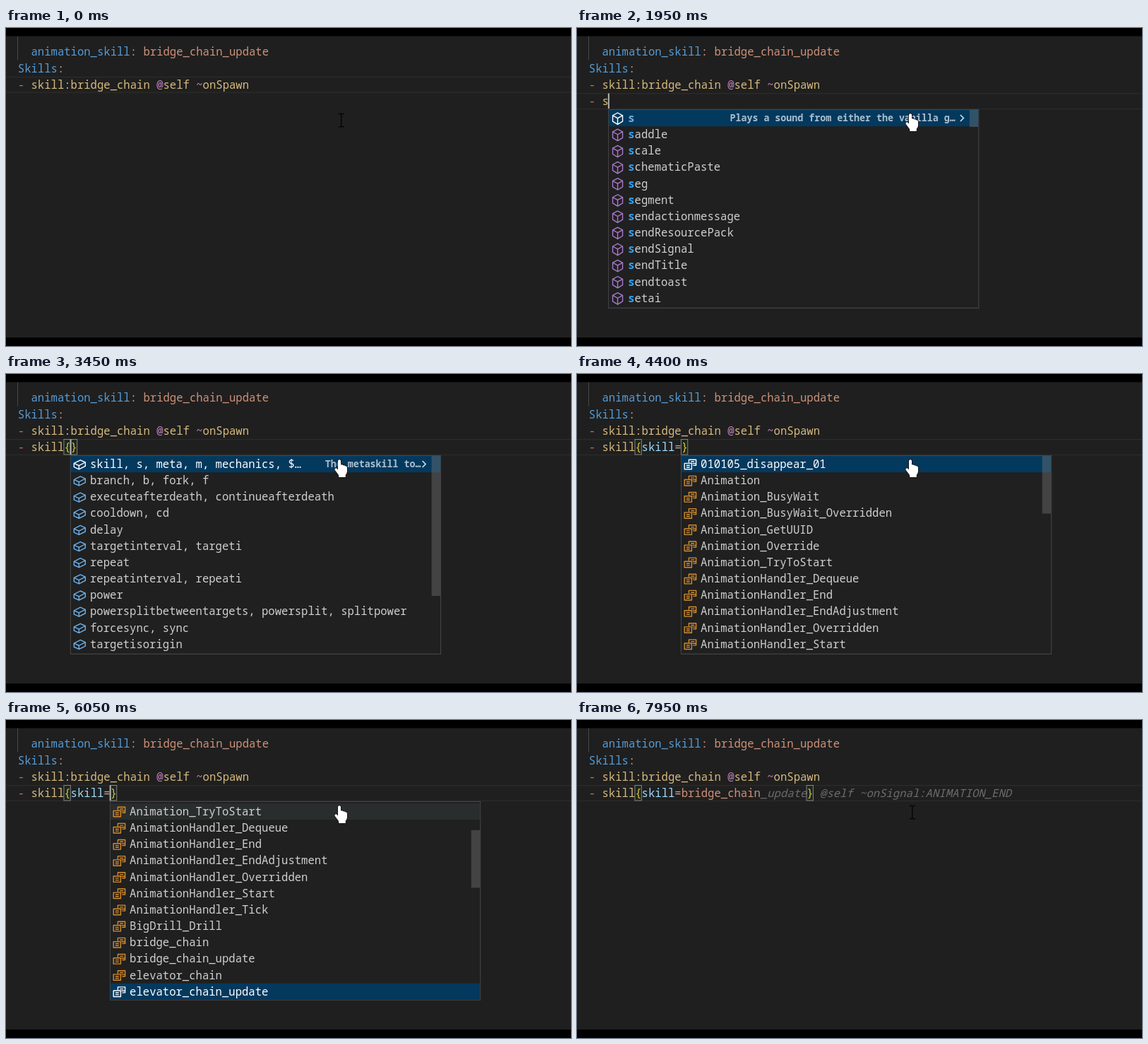
Write an HTML page with a canvas that moves like this. It is 800 px wide and 450 px high and loops after 8000 ms.

```html
<!DOCTYPE html>
<html lang="en">
<head>
<meta charset="utf-8">
<title>Editor completion</title>
<style>
html, body { margin: 0; width: 100%; height: 100%; overflow: hidden; background: #000; }
canvas { display: block; width: 800px; height: 450px; }
</style>
</head>
<body>
<canvas id="stage" width="800" height="450"></canvas>
<script>
const g = document.getElementById('stage').getContext('2d');
const LOOP = 8000, CW = 9.35, LH = 23.15, LEFT = 16.8, TOP = 116;
const FAMILY = '"Noto Sans Mono", "DejaVu Sans Mono", monospace';
const font = (style, size = 15.58) => `${style} ${size}px ${FAMILY}`;
const C = {
  bg: '#1f1f1f', key: '#569cd6', str: '#ce9178', dash: '#c9686c', fn: '#d7ba7d',
  op: '#c586c0', param: '#9cdcfe', eq: '#c9a39b', brace: '#e2c044', ghost: '#6c6c6c',
  text: '#cfcfcf', match: '#2f9ff0', matchSel: '#76a9d6', selected: '#04395e', hover: '#2a2d2e'
};

// Brackets mark the letters that match what has been typed.
const sounds = {
  icon: 'cube', thumb: 24, detail: 'Plays a sound from either the vanilla g…', detailX: 172,
  rows: ['[s]', '[s]addle', '[s]cale', '[s]chematicPaste', '[s]eg', '[s]egment', '[s]endactionmessage',
    '[s]endResourcePack', '[s]endSignal', '[s]endTitle', '[s]endtoast', '[s]etai']
};
const skills = {
  icon: 'cube', detail: 'Executes a metaskill', detailX: 331,
  rows: ['[skill]', 'sudo[skill]', 'variable[skill]']
};
const params = {
  icon: 'brick', thumb: 198, detail: 'The metaskill to…', detailX: 360.5,
  rows: ['skill, s, meta, m, mechanics, $…', 'branch, b, fork, f', 'executeafterdeath, continueafterdeath',
    'cooldown, cd', 'delay', 'targetinterval, targeti', 'repeat', 'repeatinterval, repeati', 'power',
    'powersplitbetweentargets, powersplit, splitpower', 'forcesync, sync', 'targetisorigin']
};
const handler = ['Dequeue', 'End', 'EndAdjustment', 'Overridden', 'Start', 'Tick'];
const metaskills = {
  icon: 'cards', thumb: 81.5,
  rows: ['010105_disappear_01', 'Animation',
    ...['BusyWait', 'BusyWait_Overridden', 'GetUUID', 'Override', 'TryToStart'].map(s => 'Animation_' + s),
    ...handler.map(s => 'AnimationHandler_' + s),
    'BigDrill_Drill', 'bridge_chain', 'bridge_chain_update', 'elevator_chain', 'elevator_chain_update']
};
const filtered = {
  icon: 'cards',
  rows: ['[brid]ge_chain', '[brid]ge_chain_update', '[B]igD[r]ill_Dr[i]ll'.replace('[r]ill_Dr[i]ll', '[ri]ll_[D]rill'),
    ...['Add[B]ar[ri]ers', 'Add[B]ar[ri]ers_Exec', 'Init-[b]ar[ri]ers', 'Join-[b]ar[ri]ers',
      'Remove[B]ar[ri]ers', 'Remove[B]ar[ri]ers_Exec', 'Detach-[b]ar[ri]ers'].map(s => 'Structure' + s),
    'Animation_[B]usyWait_Over[rid]den']
};
filtered.rows[2] = '[B]igD[ri]ll_[D]rill';

// at: time of the edit, name: mechanic, value: argument (null without braces), list + typed: popup
const steps = [
  { at: 100, name: '' },
  { at: 1500, name: 's', list: sounds, typed: 1, delay: 80 },
  { at: 2040, name: 'sk', list: skills, typed: 2 },
  { at: 2200, name: 'ski', list: skills, typed: 3 },
  { at: 2320, name: 'skil', list: skills, typed: 4 },
  { at: 2440, name: 'skill', list: skills, typed: 5 },
  { at: 2960, name: 'skill', body: '', list: params, delay: 80 },
  { at: 3580, name: 'skill', body: 'skill=', list: metaskills, delay: 90 },
  { at: 6360, name: 'skill', body: 'skill=', value: 'b', list: filtered, typed: 1 },
  { at: 6480, name: 'skill', body: 'skill=', value: 'br', list: filtered, typed: 2 },
  { at: 6600, name: 'skill', body: 'skill=', value: 'bri', list: filtered, typed: 3 },
  { at: 6750, name: 'skill', body: 'skill=', value: 'brid', list: filtered, typed: 4 },
  { at: 7360, name: 'skill', body: 'skill=', value: 'bridge_chain', ghostDelay: 250 }
];

const colX = col => LEFT + col * CW;

function rect(x, y, w, h, color) {
  g.fillStyle = color;
  g.fillRect(x, y, w, h);
}

function text(s, x, y, color, style = '500', size) {
  g.font = font(style, size);
  g.fillStyle = color;
  g.fillText(s, x, y);
}

// Writes coloured pieces on an editor line and returns the next column.
function write(line, col, ...parts) {
  for (const [s, color, style] of parts) {
    text(s, colX(col), 39.4 + line * LH, color, style);
    col += s.length;
  }
  return col;
}

function poly(points, close) {
  g.beginPath();
  points.forEach(([x, y]) => g.lineTo(x, y));
  if (close) g.closePath();
  g.stroke();
}

const icons = {
  cube() {
    g.strokeStyle ||= '#b180d7';
    poly([[0, -8], [7, -4.2], [7, 4.2], [0, 8.4], [-7, 4.2], [-7, -4.2]], true);
    poly([[-7, -4.2], [0, -0.4], [7, -4.2]]);
    poly([[0, -0.4], [0, 8.4]]);
  },
  brick() {
    poly([[-8, -1.6], [1, -6.2], [8, -3], [8, 2.4], [-1, 6.8], [-8, 3.6]], true);
    poly([[-8, -1.6], [-1, 1.6], [8, -3]]);
    poly([[-1, 1.6], [-1, 6.8]]);
  },
  cards() {
    poly([[-2, -2.5], [-2, -6.8], [8.2, -6.8], [8.2, 1.2], [4, 1.2]]);
    poly([[-8.2, -1.6], [2, -1.6], [2, 6.8], [-8.2, 6.8]], true);
    for (const [x, y] of [[0.8, -4], [3, -1.4], [-5.6, 1.3], [-5.6, 4]]) poly([[x, y], [x + 5, y]]);
  }
};
const iconColor = { cube: '#a878cc', brick: '#6bb0ea', cards: '#d58c2c' };

function drawIcon(kind, x, y, selected) {
  g.save();
  g.translate(x, y);
  g.strokeStyle = selected ? '#fff' : iconColor[kind];
  g.lineWidth = 1.4;
  g.lineJoin = 'round';
  icons[kind]();
  g.restore();
}

const marks = s => (s.match(/\[[^\]]*\]/g) || []).join('').replace(/[\[\]]/g, '').length;

function drawLabel(label, x, y, typed, selected) {
  const plain = selected ? '#fff' : C.text;
  let inside = false, seen = 0, run = '', lit = false;
  const flush = () => {
    text(run, x, y, lit ? (selected ? C.matchSel : C.match) : plain, lit ? '700' : '500');
    x += run.length * CW;
    run = '';
  };
  for (const ch of label) {
    if (ch === '[' || ch === ']') { inside = ch === '['; continue; }
    const hit = inside && seen++ < typed;
    if (hit !== lit) { flush(); lit = hit; }
    run += ch;
  }
  flush();
}

// Arrow key: one press, then auto-repeat to the last entry.
function selection(list, t) {
  if (list !== metaskills || t < 4450) return 0;
  if (t < 4950) return 1;
  return Math.min(17, 2 + Math.floor((t - 4950) / 33));
}

function drawPopup(step, col, t) {
  const { list, typed = 0 } = step;
  const rows = list.rows.filter(s => marks(s) >= typed);
  const x = colX(col) - 0.3, w = 524.3;
  const view = Math.min(12, rows.length) * LH + 2;
  const sel = selection(list, t);
  const scroll = Math.max(0, (sel + 1) * LH - view);
  const hover = Math.floor((122 - TOP + scroll) / LH);

  rect(x - 0.5, TOP - 1, w + 1, view + 2, '#454545');
  g.save();
  g.beginPath();
  g.rect(x + 0.5, TOP, w - 1, view);
  g.clip();
  rect(x, TOP, w, view, '#202020');
  rows.forEach((label, i) => {
    const y = TOP + i * LH - scroll;
    if (y < TOP - LH || y > TOP + view) return;
    const on = i === sel;
    if (on || i === hover) rect(x, y, w, LH, on ? C.selected : C.hover);
    drawIcon(list.icon, x + 13, y + 12, on);
    drawLabel(label, x + 27.7, y + 17, typed, on);
    if (on && list.detail) {
      text(list.detail, x + list.detailX, y + 16, '#a9bfd0', '600', 13.3);
      g.strokeStyle = '#d5dfe8';
      g.lineWidth = 1.6;
      const cx = x + w - 26;
      poly([[cx, y + 7], [cx + 4.5, y + 11.5], [cx, y + 16]]);
    }
  });
  if (list.thumb) rect(x + w - 13, TOP + scroll * list.thumb / view, 12.5, list.thumb, 'rgba(121,121,121,.4)');
  g.restore();
}

function drawHand() {
  g.save();
  g.translate(465, 120);
  g.beginPath();
  g.moveTo(5, 2.5);
  g.quadraticCurveTo(7, -0.5, 9, 2.5);
  g.lineTo(9, 8.5);
  g.quadraticCurveTo(11, 7.5, 12.3, 9.3);
  g.quadraticCurveTo(14.3, 8.7, 15.3, 10.3);
  g.quadraticCurveTo(17.8, 10, 18, 12.5);
  g.lineTo(18, 18);
  g.quadraticCurveTo(17.6, 21, 15.8, 22.5);
  g.lineTo(15.8, 26);
  g.lineTo(6.2, 26);
  g.lineTo(6, 23);
  g.lineTo(0.4, 15.5);
  g.quadraticCurveTo(0.6, 12.4, 3.2, 13.6);
  g.lineTo(5, 15.4);
  g.closePath();
  g.strokeStyle = '#111';
  g.lineWidth = 1.6;
  g.stroke();
  g.fillStyle = '#fff';
  g.fill();
  g.restore();
}

function drawBeam() {
  g.strokeStyle = '#050505';
  g.lineWidth = 1.5;
  poly([[474.7, 122], [474.7, 139.5]]);
  poly([[470.7, 121.5], [478.7, 121.5]]);
  poly([[470.7, 139.7], [478.7, 139.7]]);
}

function bracketBox(col) {
  rect(colX(col), 92.5, CW, 21.5, 'rgba(0,100,0,.12)');
  g.strokeStyle = '#858585';
  g.lineWidth = 1;
  g.strokeRect(colX(col) - 0.3, 92.5, CW, 21.5);
}

// Draws the line being edited and returns the caret column.
function drawEditLine(step, t) {
  const { name, body, value = '' } = step;
  let col = write(3, 0, ['- ', C.dash], [name, C.fn]);
  if (body === undefined) return col;
  bracketBox(col);
  col = write(3, col, ['{', C.brace]);
  if (body) col = write(3, col, ['skill', C.param], ['=', C.eq]);
  const caret = write(3, col, [value, C.str]);
  const ghost = step.ghostDelay && t >= step.at + step.ghostDelay;
  const end = ghost ? write(3, caret, ['_update', C.ghost, 'italic 500']) : caret;
  bracketBox(end);
  write(3, end, ['}', C.brace]);
  if (ghost) write(3, end + 1, [' @self ~onSignal:ANIMATION_END', C.ghost, 'italic 500']);
  return caret;
}

function draw(t) {
  const step = steps.filter(s => s.at <= t).pop();
  rect(0, 0, 800, 450, '#000');
  rect(0, 11.5, 800, 426.5, C.bg);
  rect(16, 12, 1, 33.5, '#484848');

  const lineTop = step ? 92 : 68.8;
  rect(0, lineTop, 800, 1.3, '#2b2b2b');
  rect(0, lineTop + 21.8, 800, 1.3, '#2b2b2b');

  write(0, 2, ['animation_skill', C.key], [': ', C.str], ['bridge_chain_update', C.str]);
  write(1, 0, ['Skills', C.key], [':', C.str]);
  write(2, 0, ['- ', C.dash], ['skill:bridge_chain ', C.fn], ['@', C.op], ['self ', C.fn],
    ['~', C.op], ['onSpawn', C.fn]);

  let popup = false;
  if (step) {
    const col = drawEditLine(step, t);
    if ((t - step.at) % 1000 < 500) rect(colX(col) - 1, 92.5, 2, 21.5, '#b4b4b0');
    popup = step.list && t >= step.at + (step.delay || 0);
    if (popup) drawPopup(step, col, t);
  }
  if (popup) drawHand(); else drawBeam();
}

const start = performance.now();
function tick() {
  draw((performance.now() - start) % LOOP);
  requestAnimationFrame(tick);
}
tick();
</script>
</body>
</html>
```
